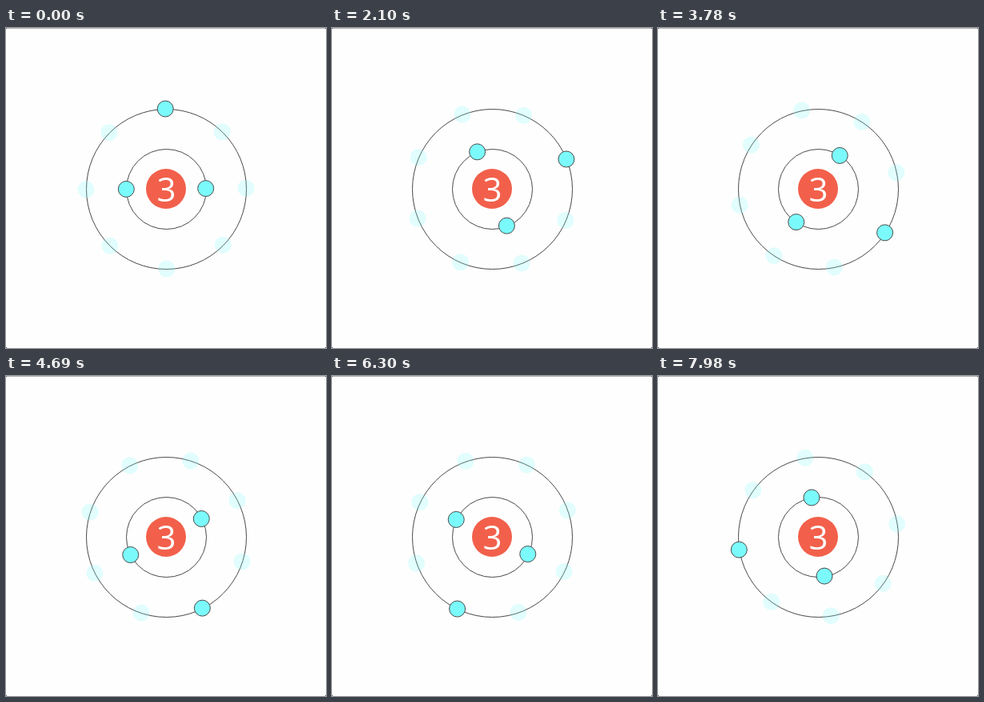
These frames come from a looping animation (400 by 400 pixels, 8000 ms). An HTML page with a canvas:

```html
<!DOCTYPE html>
<html lang="en">
<head>
<meta charset="utf-8">
<title>Electron shells</title>
<style>
  html, body { margin: 0; width: 100%; height: 100%; overflow: hidden; background: #fefefe; }
  canvas { display: block; width: 400px; height: 400px; }
</style>
</head>
<body>
<canvas id="stage" width="400" height="400"></canvas>
<script>
const ctx = document.getElementById('stage').getContext('2d');
const LOOP = 8000, STEP = 70, TURN = 11000;
const CX = 200, CY = 201;
const CYAN = '#7bfafc', LINE = '#4a4a4a', RED = '#f2604b';

function circle(x, y, r, fill, stroke) {
  ctx.beginPath();
  ctx.arc(x, y, r, 0, Math.PI * 2);
  if (fill) { ctx.fillStyle = fill; ctx.fill(); }
  if (stroke) { ctx.strokeStyle = stroke; ctx.lineWidth = 1; ctx.stroke(); }
}

function electron(radius, angle, filled) {
  const x = CX + radius * Math.cos(angle);
  const y = CY + radius * Math.sin(angle);
  if (filled) {
    circle(x, y, 10, CYAN, LINE);
  } else {
    circle(x, y, 10.5, 'rgba(123, 250, 252, 0.22)');
  }
}

function frameEdge() {
  ctx.fillStyle = '#b4b4b4';
  ctx.fillRect(0, 0, 400, 1);
  ctx.fillStyle = '#555';
  for (const x of [0, 399]) for (const y of [0, 399]) ctx.fillRect(x, y, 1, 1);
}

function draw(time) {
  const t = Math.floor((time % LOOP) / STEP) * STEP;
  const spin = t / TURN * Math.PI * 2 - 0.008;

  ctx.fillStyle = '#fefefe';
  ctx.fillRect(0, 0, 400, 400);
  frameEdge();

  circle(CX + 0.5, CY + 0.5, 100, null, LINE);
  circle(CX + 0.5, CY + 0.5, 50, null, LINE);

  // Eight outer places, only the first one occupied
  for (let i = 7; i >= 0; i--) {
    electron(100, spin - Math.PI / 2 + i * Math.PI / 4, i === 0);
  }
  electron(49.7, spin, true);
  electron(49.7, spin + Math.PI, true);

  circle(CX, CY, 25, RED);
  ctx.fillStyle = '#fff';
  ctx.font = '42px "Open Sans", "Noto Sans", sans-serif';
  ctx.textAlign = 'center';
  ctx.textBaseline = 'alphabetic';
  ctx.fillText('3', CX + 0.5, 216.5);
}

const start = performance.now();
function tick() {
  draw(performance.now() - start);
  requestAnimationFrame(tick);
}
tick();
</script>
</body>
</html>
```
